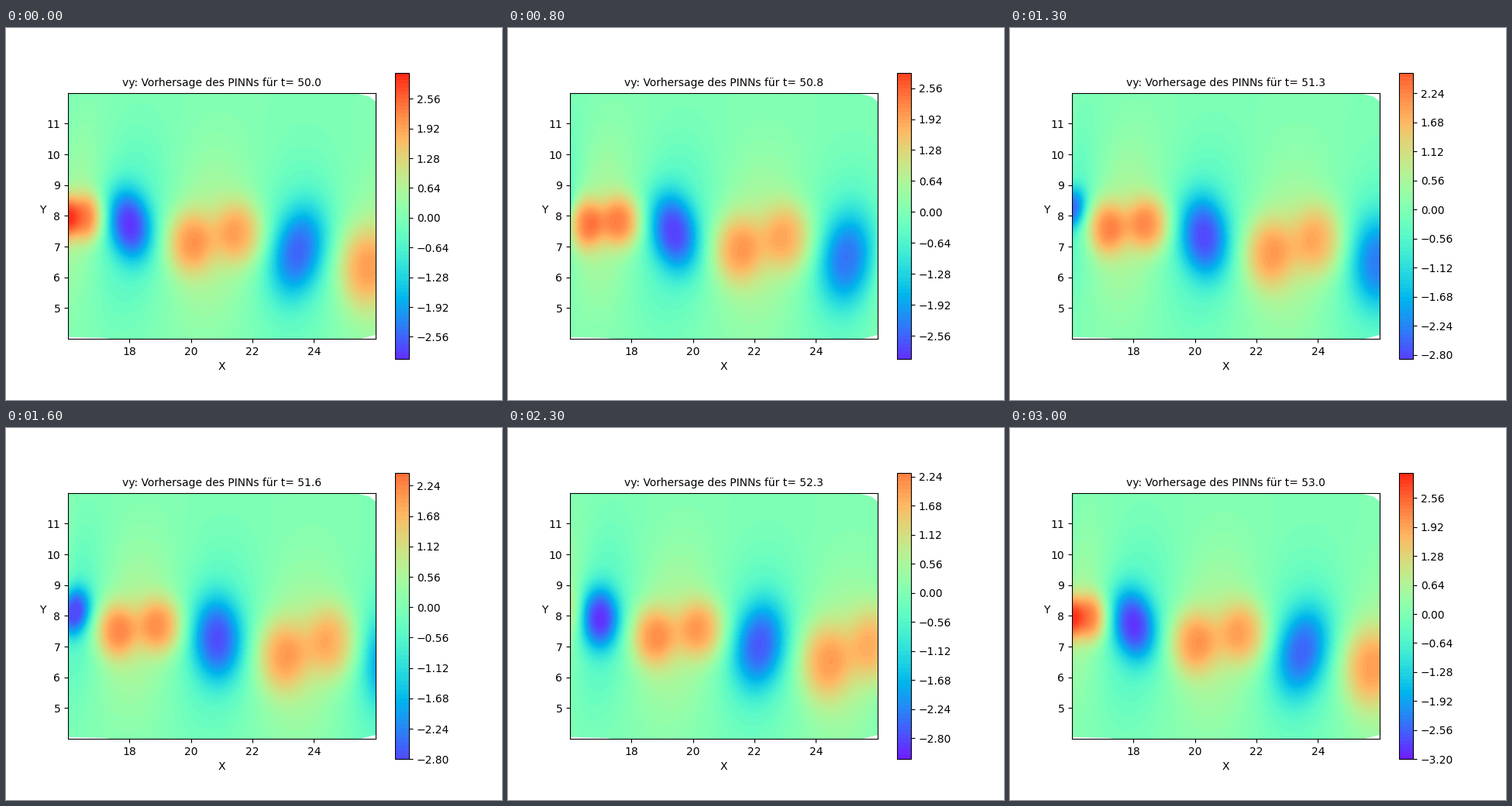
A matplotlib script that plays this animation: 640 by 480 pixels, repeating every 3100 ms.

```python
import numpy as np
import matplotlib.pyplot as plt
from matplotlib.animation import FuncAnimation

FRAMES = 31
PERIOD = 30    # frames between two vortices
STEP = 0.08    # spacing of the contour levels
VMAX = 3.45    # colour range
START, SPEED, ONSET, EASE = 15.42, 0.19, 17.5, 7   # drift of the vortex street

X, Y = np.meshgrid(np.linspace(16, 26, 301), np.linspace(4, 12, 241))

# Key points (frame, count) for the number of levels above and below zero
HIGH = ((0, 39), (5, 39), (8, 36), (20, 29), (24, 29), (27, 38), (30, 39))
LOW = ((0, 38), (8, 38), (12, 36), (16, 35), (20, 40), (30, 40))

# Corners outside the sampled area
GAPS = [
    [(25.3, 12), (25.8, 11.88), (26, 11.72), (26, 12)],
    [(25.5, 4), (26, 4.13), (26, 4)],
    [(16, 4.06), (17.2, 4.03), (17.4, 4), (16, 4)],
    [(16, 11.95), (16.15, 12), (16, 12)],
]


def smooth(t):
    t = np.clip(t, 0, 1)
    return t * t * (3 - 2 * t)


def grow(t, size, rate):
    return size * (1 - np.exp(-t / rate))


def drift(age):
    """Position of a structure that starts at rest and speeds up."""
    return START + SPEED * EASE * np.log1p(np.exp((age - ONSET) / EASE))


def age_at(x):
    """Inverse of drift."""
    return ONSET + EASE * np.log(np.expm1((x - START) / (SPEED * EASE)))


def blob(x, y, amp, sx, sy, shear=0.0):
    u = (X - x - shear * (Y - y)) / sx
    v = (Y - y) / sy
    return amp * np.exp(-(u**2 + v**2) ** 1.25)


def wave(i):
    """Broad alternating background that travels with the vortices."""
    lean = np.maximum(X - 0.1 * (Y - 7.5), START + 0.1)
    phase = 2 * np.pi * (age_at(lean) - i) / PERIOD
    middle = 7.9 - 0.14 * (X - 16)
    return -grow(X - 15, 0.75, 1) * np.cos(phase) * np.exp(-((Y - middle) / 2.8) ** 2)


def sinking(age):
    amp = (2.75 - 0.016 * age) * smooth(age / 18)
    size = max(age, 3)
    shear = -0.15 * np.cos(2 * np.pi * (age - 35) / 50)
    return blob(drift(age), 8.6 - 0.029 * age, -amp,
                grow(size, 0.92, 17), grow(size, 1.6, 22), shear)


def rising(age):
    """Two lobes that are born together and move apart."""
    amp = (1.3 + 0.8 * np.exp(-age / 22)) * smooth((age + 12) / 14)
    total = 0
    for lead, fall in ((11, 0.027), (20, 0.017)):
        own = age + lead
        total = total + blob(drift(own), 7.95 - fall * age, amp,
                             grow(max(own, 5), 0.88, 18), 0.8 + 0.009 * max(age, 0))
    return total


def velocity(i):
    total = wave(i)
    for k in range(3):
        total = total + sinking(i + k * PERIOD)
    for k in range(-1, 3):
        total = total + rising(i + k * PERIOD)
    return total


def count(keys, i):
    return int(round(np.interp(i, *zip(*keys))))


def draw(i):
    fig.clear()
    ax = fig.add_subplot()
    levels = np.arange(-count(LOW, i), count(HIGH, i) + 1) * STEP
    field = np.clip(velocity(i), levels[0] + 1e-3, levels[-1] - 1e-3)
    filled = ax.contourf(X, Y, field, levels=levels, cmap="rainbow",
                         vmin=-VMAX, vmax=VMAX)
    for corner in GAPS:
        ax.add_patch(plt.Polygon(corner, fc="white", ec="none", zorder=1.5))
    ax.set_aspect("equal")
    ax.set_xlim(16.001, 25.999)
    ax.set_ylim(4.001, 11.999)
    ax.set_xlabel("X")
    ax.set_ylabel("Y", rotation=0)
    ax.set_title(f"vy: Vorhersage des PINNs für t= {50 + i / 10:.1f}", fontsize=10)
    fig.colorbar(filled, ax=ax)


fig = plt.figure(figsize=(6.4, 4.8), dpi=100)
anim = FuncAnimation(fig, draw, frames=FRAMES, interval=100, repeat=True)
plt.show()
```
